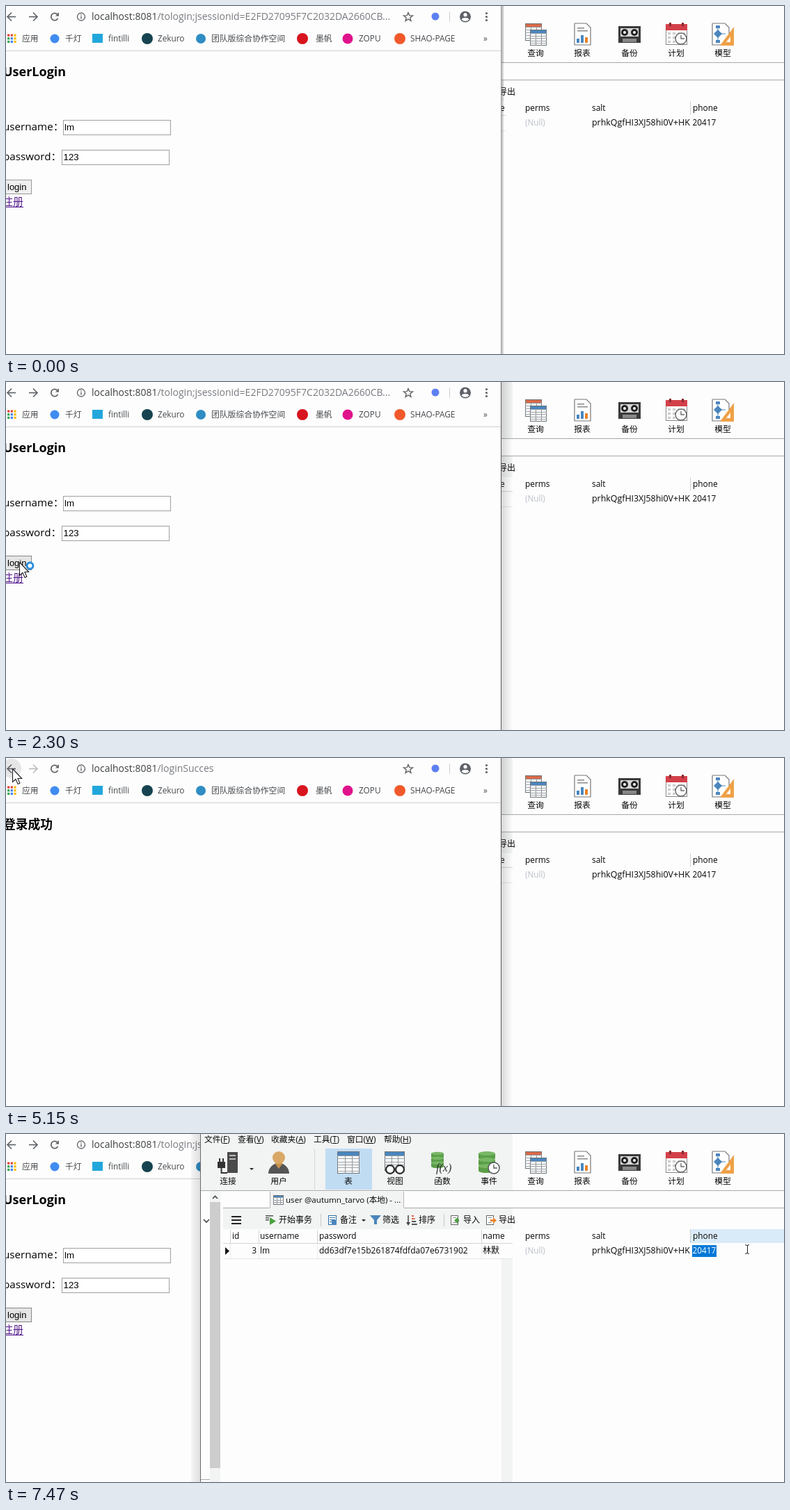
An HTML page with a canvas for the animation above (8 s loop, 1118 px wide and 501 px high).

```html
<!DOCTYPE html>
<html lang="zh">
<head>
<meta charset="utf-8">
<style>
html, body { margin: 0; overflow: hidden; background: #fdfdfd; }
canvas { display: block; }
</style>
</head>
<body>
<canvas id="stage" width="1118" height="501"></canvas>
<script>
const ctx = document.getElementById('stage').getContext('2d');
const LOOP = 8000, PAPER = '#fdfdfd', INK = '#080808', GREY = '#5f6368', CHROME = '#f2f3f3';
const SANS = '"Open Sans","Noto Sans CJK SC","Noto Sans CJK",sans-serif';
const ARIAL = '"Liberation Sans",sans-serif';

// Moments at which the picture changes abruptly
const FOCUS = 2300, SUCCESS = 2450, BACK = 5380, RAISE = 6770, SELECT = 6850;

// Cursor path: time, x, y of the tip
const path = [
  [130, 934, 472], [450, 520, 340], [680, 200, 219], [910, 68, 256], [1070, 37, 255],
  [1220, 37, 255], [1300, 33, 259], [1450, 33, 259], [1530, 27, 259], [2220, 19, 259],
  [3130, 19, 259], [3370, 171, 285], [3530, 171, 285], [4060, 18, 35], [4280, 9, 15],
  [5400, 9, 15], [5750, 520, 190], [6070, 1100, 286], [6300, 1082, 220], [6690, 1064, 165]
];

function box(x, y, w, h, color) { ctx.fillStyle = color; ctx.fillRect(x, y, w, h); }
function frame(x, y, w, h, color, fill) {
  if (fill) box(x, y, w, h, fill);
  ctx.strokeStyle = color; ctx.lineWidth = 1;
  ctx.strokeRect(x + .5, y + .5, w - 1, h - 1);
}
function trace(pts) {
  ctx.beginPath();
  for (let i = 0; i < pts.length; i += 2) ctx.lineTo(pts[i], pts[i + 1]);
}
function line(pts, color, width = 1) {
  trace(pts); ctx.strokeStyle = color; ctx.lineWidth = width; ctx.stroke();
}
function poly(pts, color) { trace(pts); ctx.closePath(); ctx.fillStyle = color; ctx.fill(); }
function disc(x, y, r, color) {
  ctx.beginPath(); ctx.arc(x, y, r, 0, 7); ctx.fillStyle = color; ctx.fill();
}
function ring(x, y, r, color, width, from = 0, to = 2 * Math.PI) {
  ctx.beginPath(); ctx.arc(x, y, r, from, to);
  ctx.strokeStyle = color; ctx.lineWidth = width; ctx.stroke();
}
function text(s, x, y, size = 12, color = INK, align = 'left', weight = '', family = SANS) {
  ctx.font = `${weight} ${size}px ${family}`;
  ctx.textAlign = align; ctx.fillStyle = color; ctx.fillText(s, x, y);
  return ctx.measureText(s).width;
}
function fade(x0, x1, from, to) {
  const g = ctx.createLinearGradient(x0, 0, x1, 0);
  g.addColorStop(0, from); g.addColorStop(1, to);
  box(x0, 0, x1 - x0, 501, g);
}

// ---------- browser ----------
function arrow(x, dir, color) {
  line([x - 6 * dir, 15.5, x + 6 * dir, 15.5], color, 1.7);
  line([x, 9.5, x + 6 * dir, 15.5, x, 21.5], color, 1.7);
}

function addressBar(t, success) {
  if (t >= 4200 && t < 5450) disc(8, 15, 14, '#e6e6e6');
  arrow(8, -1, GREY);
  arrow(39, 1, success ? '#bdbdbd' : GREY);
  ring(70, 15.5, 5.2, GREY, 1.7, .5, 5.6);
  poly([71, 14.5, 76, 14.5, 76, 9], GREY);
  ring(108, 15.5, 5.5, GREY, 1.3);
  box(107.3, 14.5, 1.4, 4, GREY); box(107.3, 12, 1.4, 1.4, GREY);
  const w = text('localhost:8081', 123, 20, 14, '#3c4043');
  text(success ? '/loginSucces' : '/tologin;jsessionid=E2FD27095F7C2032DA2660CB...', 123 + w, 20, 14, '#777b80');
  const star = [];
  for (let i = 0; i <= 10; i++) {
    const r = i % 2 ? 2.9 : 6.8, a = i * Math.PI / 5;
    star.push(578 + r * Math.sin(a), 16 - r * Math.cos(a));
  }
  line(star, GREY, 1.4);
  disc(617, 15, 5.5, '#5c80f2');
  box(637, 8, 1, 15, '#d0d0d0');
  disc(660, 15.5, 8, GREY);
  disc(660, 12.7, 2.6, PAPER);
  ctx.beginPath(); ctx.ellipse(660, 19.3, 5, 2.4, 0, 0, 7); ctx.fill();
  for (const y of [10.5, 15.5, 20.5]) disc(690.5, y, 1.6, GREY);
}

function bookmarks() {
  const dots = ['#ea4335', '#ea4335', '#fbbc05', '#34a853', '#4285f4', '#fbbc05', '#34a853', '#4285f4', '#fbbc05'];
  dots.forEach((c, i) => box(2 + i % 3 * 4.7, 40.5 + Math.floor(i / 3) * 4.7, 3.2, 3.2, c));
  box(124, 40, 15, 13, '#22a7dc');
  [[70, 6.5, '#3f8cf0'], [203, 8, '#15434f'], [280, 7, '#2f8dc4'], [426, 8, '#d8141f'],
   [491, 7.5, '#e0148c'], [566, 8, '#f1592a']].forEach(([x, r, c]) => disc(x, 47, r, c));
  [['应用', 23], ['千灯', 85], ['fintilli', 147], ['Zekuro', 218], ['团队版综合协作空间', 295],
   ['墨帆', 445], ['ZOPU', 507], ['SHAO-PAGE', 581], ['»', 686]]
    .forEach(([s, x]) => text(s, x, 51, 11.8, '#45494d'));
}

function loginPage(hover) {
  text('UserLogin', -4, 101, 18, '#000', 'left', 'bold');
  text('username：', -4, 179, 15.2, '#000');
  text('password：', -4, 222, 15.2, '#000');
  frame(82, 164, 155, 22, '#a0a0a0', '#fff');
  frame(80, 207, 155, 22, '#a0a0a0', '#fff');
  text('lm', 84, 179, 13.3, '#000', 'left', '', ARIAL);
  text('123', 82.5, 222, 13.3, '#000', 'left', '', ARIAL);
  frame(-8, 250, 45, 21, hover ? '#888' : '#999', hover ? '#e5e5e5' : '#efefef');
  text('login', 2, 265, 13, '#000', 'left', '', ARIAL);
  text('注册', -5, 287, 15, '#551a8b');
  box(0, 289, 25, 1, '#551a8b');
}

function browser(t) {
  const success = t >= SUCCESS && t < BACK;
  ctx.save();
  ctx.beginPath(); ctx.rect(0, 0, 711, 501); ctx.clip();
  box(0, 0, 711, 501, PAPER);
  addressBar(t, success);
  bookmarks();
  box(0, 64, 711, 1, '#cfcfcf');
  if (success) text('登录成功', -4, 102, 17.8, '#000', 'left', 'bold');
  else loginPage(t >= 1070 && t < SUCCESS || t >= BACK);
  ctx.restore();
  if (t < FOCUS) {
    box(711, 0, 1, 501, '#a2a2a2');
    fade(712, 715, 'rgba(0,0,0,.25)', 'rgba(0,0,0,.12)');
  } else {
    box(711, 0, 1, 501, '#5e5e5e');
    fade(712, 728, 'rgba(0,0,0,.14)', 'rgba(0,0,0,0)');
  }
}

// ---------- database window ----------
function table(x, y, w, h, head, cols = 3, rows = 5) {
  frame(x, y, w, h, '#6d7378', '#fff');
  const hh = Math.round(h / 5);
  box(x + 1, y + 1, w - 2, hh, head);
  for (let i = 1; i < cols; i++) box(Math.round(x + w * i / cols), y + hh, 1, h - hh, '#8a9095');
  for (let i = 0; i < rows; i++) box(x, Math.round(y + hh + (h - hh) * i / rows), w, 1, '#9aa0a5');
}
function clock(x, y, r, color) {
  disc(x, y, r, '#fff'); ring(x, y, r, color, 1.5);
  line([x, y - r + 3, x, y, x + r - 3, y], color, 1.3);
}
function cylinder(x, y, w) {
  const r = w / 2, step = w * .38;
  for (let i = 0; i < 3; i++) {
    const top = y + i * step, h = step * .75;
    box(x, top, w, h, '#5a9e48');
    ctx.beginPath(); ctx.ellipse(x + r, top + h, r, r / 4, 0, 0, 7); ctx.fill();
    ctx.beginPath(); ctx.ellipse(x + r, top, r, r / 4, 0, 0, 7); ctx.fillStyle = '#78b765'; ctx.fill();
  }
}
function sheet(x, y, w, h) {
  poly([x, y, x + w - 6, y, x + w, y + 6, x + w, y + h, x, y + h], '#fff');
  line([x, y, x + w - 6, y, x + w, y + 6, x + w, y + h, x, y + h, x, y], '#777', 1.2);
}
const caretDown = (x, y) => poly([x - 3, y, x + 3, y, x, y + 3], '#222');

const tools = [
  ['连接', 319, () => {
    box(318, 26, 15, 30, '#4b4b4b'); box(321, 30, 9, 2, '#bbb'); box(321, 35, 9, 2, '#bbb');
    box(304, 40, 11, 9, '#333'); box(306, 35, 2, 5, '#333'); box(311, 35, 2, 5, '#333');
    line([309.5, 48, 309.5, 56, 318, 56], '#333', 2);
    caretDown(353, 49);
  }],
  ['用户', 392, () => {
    ctx.beginPath(); ctx.arc(392, 57, 15, Math.PI, 0); ctx.fillStyle = '#555'; ctx.fill();
    poly([386, 42, 398, 42, 392, 50], '#c8924f');
    disc(392, 34, 9, '#d9a866');
  }],
  ['表', 492, () => table(476, 25, 32, 32, '#4a86bd', 3, 6)],
  ['视图', 559, () => {
    table(544, 25, 29, 28, '#4a86bd');
    for (const x of [552, 566]) { disc(x, 51, 6, '#fff'); ring(x, 51, 6, '#333', 2.4); }
    line([558, 50, 560, 50], '#333', 2);
  }],
  ['函数', 627, () => {
    cylinder(611, 28, 18);
    text('f(x)', 618, 54, 16, '#333', 'left', 'italic', '"Liberation Serif",serif');
  }],
  ['事件', 694, () => { cylinder(679, 28, 24); clock(701, 49, 8, '#555'); }],
  ['查询', 761, () => { table(746, 25, 24, 25, '#d8694a'); table(753, 34, 24, 23, '#4a86bd'); }],
  ['报表', 828, () => {
    sheet(817, 25, 23, 31);
    for (const y of [31, 35]) box(821, y, y < 33 ? 10 : 15, 1.5, '#888');
    [[6, '#4a86bd'], [11, '#4a86bd'], [8, '#e8862c']].forEach(([h, c], i) => box(820 + i * 6, 53 - h, 4, h, c));
  }],
  ['备份', 896, () => {
    box(880, 29, 32, 24, '#3a3a3a'); box(883, 32, 26, 12, '#d8d8d8');
    for (const x of [889, 903]) { disc(x, 38, 5, '#222'); disc(x, 38, 2, '#fff'); }
    box(886, 47, 20, 5, '#888');
  }],
  ['计划', 963, () => {
    frame(948, 26, 31, 30, '#888', '#fff'); box(948, 26, 31, 9, '#d2404a');
    box(953, 24, 3, 5, '#8d2730'); box(971, 24, 3, 5, '#8d2730');
    for (let i = 0; i < 12; i++) box(951 + i % 4 * 7, 38 + Math.floor(i / 4) * 6, 4, 3, '#ccc');
    clock(970, 47, 8, '#666');
  }],
  ['模型', 1030, () => {
    sheet(1015, 25, 24, 31);
    line([1023, 31, 1023, 49], '#4a86bd'); line([1023, 40, 1034, 40], '#4a86bd');
    poly([1023, 34, 1029, 40, 1023, 46, 1017, 40], '#4a86bd');
    box(1020, 28, 6, 4, '#4a86bd'); box(1020, 49, 6, 4, '#4a86bd');
    poly([1046, 30, 1046, 57, 1026, 57], '#efa046'); poly([1041, 44, 1041, 52, 1035, 52], '#fff');
  }]
];

function menuBar() {
  [['文件', 'F', 285], ['查看', 'V', 333], ['收藏夹', 'A', 381], ['工具', 'T', 442],
   ['窗口', 'W', 490], ['帮助', 'H', 543]].forEach(([label, key, x]) => {
    text(`${label}(${key})`, x, 12, 11.8);
    const start = x + ctx.measureText(label + '(').width;
    box(start, 13, ctx.measureText(key).width, 1, INK);
  });
}

function actionRow() {
  for (const y of [118, 123, 128]) box(324, y, 14, 2, '#222');
  poly([379, 120, 388, 125.5, 379, 131], '#4ca23f');
  for (const y of [117, 120, 123]) box(373, y, y < 120 ? 11 : 5, 1.5, '#555');
  box(452, 115, 1, 18, '#c8c8c8'); box(629, 115, 1, 18, '#c8c8c8');
  frame(463, 117, 12, 14, '#2c6da3', '#fff');
  for (const y of [120, 123, 126]) box(465, y, 8, 1, '#2c6da3');
  box(468, 124, 7, 7, '#4a86bd');
  caretDown(514, 123);
  poly([523, 117, 539, 117, 533, 124, 533, 130, 529, 130, 529, 124], '#4a86bd');
  line([578, 117, 578, 130], '#444', 1.5); poly([575, 127, 581, 127, 578, 132], '#444');
  for (let i = 0; i < 4; i++) box(583, 117 + i * 4, 3 + i * 1.6, 2, i < 2 ? '#d8694a' : '#555');
  for (const [x, c, d] of [[639, '#4ca23f', -1], [690, '#e8862c', 1]]) {
    frame(x, 117, 11, 14, '#666', '#fff');
    box(x + 3, 120, 5, 1, '#888'); box(x + 3, 127, 5, 1, '#888');
    box(x + 6, 123, 6, 3, c);
    const m = x + 10;
    poly([m, 120, m, 129, m + 5 * d, 124.5], c);
  }
  [['开始事务', 392], ['备注', 480], ['筛选', 541], ['排序', 593], ['导入', 657], ['导出', 708]]
    .forEach(([s, x]) => text(s, x, 128, 12));
}

function grid(t) {
  const selected = t >= SELECT;
  box(312, 137, 400, 364, PAPER);
  if (selected) box(983, 137, 135, 20, '#d9ebf9');
  for (const x of [322, 363, 447, 683]) {
    box(x, 138, 1, 19, '#d4d4d4'); box(x, 158, 1, 21, '#ececec');
  }
  box(983, 137, 1, 20, '#cfcfcf');
  const edge = t < FOCUS ? 718 : 728;
  box(312, 157, edge - 312, 1, '#d4d4d4'); box(312, 179, edge - 312, 1, '#e6e6e6');
  [['id', 325], ['username', 365], ['password', 450], ['name', 685], ['perms', 746], ['salt', 842], ['phone', 987]]
    .forEach(([s, x]) => text(s, x, 151, 11.9));
  poly([315, 163, 321, 168.5, 315, 174], '#111');
  text('3', 360, 172, 12, INK, 'right');
  text('lm', 365, 172);
  text('dd63df7e15b261874fdfda07e6731902', 450, 172);
  text('林默', 685, 172);
  text('(Null)', 746, 172, 11.7, '#b9bfc9');
  ctx.save();
  ctx.beginPath(); ctx.rect(840, 158, 144, 21); ctx.clip();
  text('prhkQgfHI3XJ58hi0V+HK', 842, 172, 12.4);
  ctx.restore();
  if (selected) box(986, 160, 35, 17, '#0078d7');
  text('20417', 986.5, 172, 11.8, selected ? '#fff' : INK);
  if (selected && t < 7470) box(1020, 160, 1, 17, '#222');
}

function database(t) {
  const edge = t < FOCUS ? 716 : 728;
  ctx.save();
  ctx.beginPath(); ctx.rect(279, 0, 839, 501); ctx.clip();
  box(279, 0, 839, 501, PAPER);
  box(279, 0, edge - 279, 81, CHROME);
  box(279, 107, edge - 279, 30, CHROME);
  if (t >= RAISE) box(712, 179, edge - 712, 322, CHROME);
  menuBar();
  box(459, 21, 67, 59, '#c0dcf3');
  box(443, 22, 1, 58, '#d5d5d5');
  for (const [label, x, icon] of tools) { icon(); text(label, x, 72, 11.8, INK, 'center'); }
  box(279, 81, 839, 1, '#a9a9a9');
  box(312, 106, 806, 1, '#a9a9a9');
  // tab
  box(379, 83, 193, 24, CHROME);
  box(379, 83, 1, 23, '#b5b5b5'); box(571, 83, 1, 23, '#b5b5b5');
  table(384, 88, 15, 14, '#4a86bd', 3, 3);
  text('user @autumn_tarvo (本地) - ...', 402, 99, 11.6);
  actionRow();
  grid(t);
  // side scrollbar
  box(280, 82, 32, 419, PAPER);
  box(293, 82, 15, 419, CHROME);
  box(293, 98, 15, 383, '#cdcdcd');
  line([297, 93, 300.5, 89.5, 304, 93], '#444', 1.6);
  line([284, 123, 288, 127, 292, 123], '#444', 1.6);
  box(280, 497, 13, 1, '#aaa');
  ctx.restore();
}

// ---------- pointer ----------
function pointerAt(t) {
  const i = path.findIndex(p => p[0] > t);
  if (i < 0) return path[path.length - 1].slice(1);
  const [t0, x0, y0] = path[i - 1], [t1, x1, y1] = path[i];
  const u = Math.min(1, Math.floor((t - t0) / 77) * 77 / (t1 - t0));
  return [x0 + (x1 - x0) * u, y0 + (y1 - y0) * u];
}

function pointer(t) {
  if (t < path[0][0]) return;
  const [x, y] = pointerAt(t);
  if (t >= SELECT) {
    line([1062, 159.5, 1065, 160.5, 1068, 159.5], '#222');
    line([1065.5, 160, 1065.5, 172], '#222');
    line([1062, 172.5, 1065, 171.5, 1068, 172.5], '#222');
    return;
  }
  const shape = [0, 0, 0, 19, 4.4, 15, 7.6, 22, 10.4, 20.8, 7.4, 14, 13.2, 14, 0, 0]
    .map((v, i) => v + (i % 2 ? y : x) + .5);
  poly(shape, '#fff');
  line(shape, '#222', 1.1);
  if (t >= 1500 && t < 2900) {
    disc(x + 15.5, y + 5.5, 5, '#fff');
    ring(x + 15.5, y + 5.5, 4.4, '#2a8fe0', 3);
  }
}

function draw() {
  const t = performance.now() % LOOP;
  if (t < RAISE) {
    database(t);
    browser(t);
  } else {
    browser(t);
    fade(266, 279, 'rgba(0,0,0,.03)', 'rgba(0,0,0,.12)');
    database(t);
    box(279, 0, 1, 501, '#6b6b6b');
  }
  if (t >= 4600 && t < 5150) {
    frame(18, 28, 189, 24, '#b8b8b8', '#fff');
    text('点击可后退，按住可查看历史记录', 25, 44.5, 11.7, '#575757');
  }
  pointer(t);
  requestAnimationFrame(draw);
}
draw();
</script>
</body>
</html>
```
